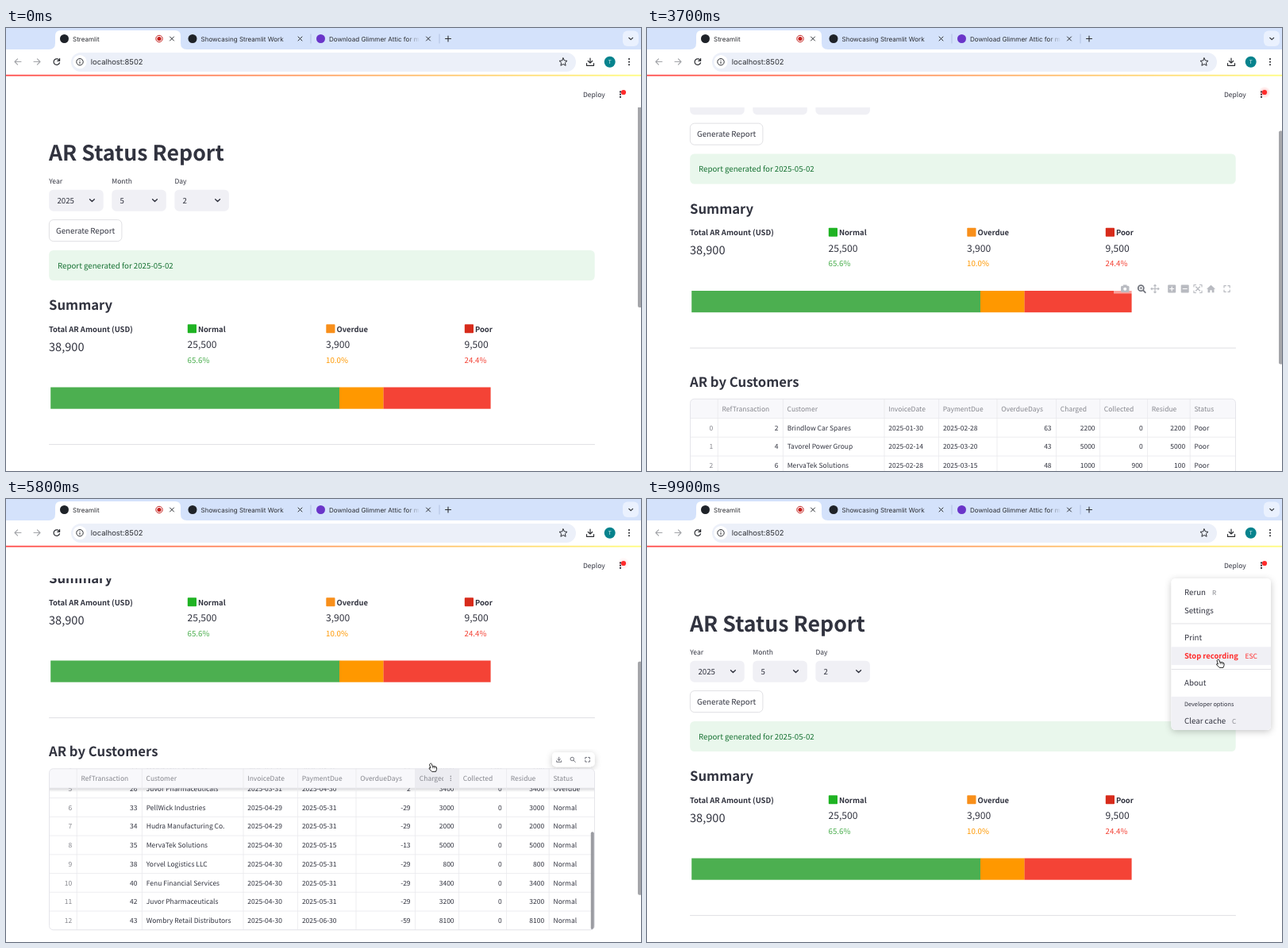
These frames come from a looping animation (800 px wide and 558 px high, 10000 ms). An HTML page:

```html
<!DOCTYPE html>
<html lang="en">
<head>
<meta charset="utf-8">
<title>AR Status Report</title>
<style>
html, body { margin: 0; width: 100%; height: 100%; overflow: hidden; background: #fff; }
svg { display: block; width: 100vw; height: 100vh; }
text { font-family: "Noto Sans CJK JP", "Noto Sans CJK SC", "Noto Sans CJK", sans-serif; text-rendering: geometricPrecision; white-space: pre; }
.ui text { font-family: Inter, Roboto, sans-serif; }
</style>
</head>
<body>
<svg id="stage" viewBox="0 0 800 558"></svg>
<script>
const INK = '#31333f', GRAY = '#85868d', RED = '#ff2b2b', LINE = '#e9e9ed', TABS = '#d4e2fb';
const BOLD = 'font-weight="700"', END = 'text-anchor="end"';

const text = (x, y, s, size = 9.72, fill = INK, attr = '') =>
  `<text x="${x}" y="${y}" font-size="${size}" fill="${fill}" ${attr}>${s}</text>`;
const rect = (x, y, w, h, fill, r = 0, attr = '') =>
  `<rect x="${x}" y="${y}" width="${w}" height="${h}" rx="${r}" fill="${fill}" ${attr}/>`;
const dot = (x, y, r, fill, attr = '') => `<circle cx="${x}" cy="${y}" r="${r}" fill="${fill}" ${attr}/>`;
const line = (d, color = INK, w = 1.2) =>
  `<path d="${d}" fill="none" stroke="${color}" stroke-width="${w}" stroke-linecap="round" stroke-linejoin="round"/>`;
const kebab = (x, y, gap, r, fill) => [-gap, 0, gap].map(d => dot(x, y + d, r, fill)).join('');
const group = (id, body, attr = '') => `<g id="${id}" ${attr}>${body}</g>`;
const fade = (id, dir, stops) => `<linearGradient id="${id}" ${dir}>` +
  stops.map(([o, c, a]) => `<stop offset="${o}" stop-color="${c}" stop-opacity="${a}"/>`).join('') + '</linearGradient>';

const defs = `<defs>
  <clipPath id="pageClip">${rect(0, 100, 800, 458, '#000')}</clipPath>
  <clipPath id="tableClip">${rect(54.5, 588.75, 687, 203, '#000', 5)}</clipPath>
  ${fade('rainbow', '', [[0, '#ff4b4b', 1], [1, '#fffd80', 1]])}
  ${fade('tabEnd', '', [[0, TABS, 0], [.7, TABS, 1]])}
  ${fade('under', 'x2="0" y2="1"', [[0, '#31333f', .2], [1, '#31333f', 0]])}
  <radialGradient id="glowFill"><stop offset=".35" stop-color="#ff2b2b"/><stop offset="1" stop-color="#ff2b2b" stop-opacity="0"/></radialGradient>
  <filter id="shadow" x="-20%" y="-20%" width="140%" height="140%"><feDropShadow dx="0" dy="2" stdDeviation="4" flood-color="#000" flood-opacity=".22"/></filter>
</defs>`;

function browser() {
  const dark = '#2c2e33';
  const close = x => line(`M${x - 2.5} 11l5 5m0-5l-5 5`, dark, 1);
  return group('browser',
    rect(0, 0, 800, 28, TABS) + rect(0, 27, 800, 32, '#fff') +
    `<path d="M54 27q8 0 8-8V10q0-7 7-7H213q7 0 7 7V19q0 8 8 8z" fill="#fff"/>` +
    dot(73.5, 13.5, 5.5, '#1f2329') + text(84, 16.5, 'Streamlit', 8.05, dark) +
    dot(193, 13.5, 4.2, 'none', 'stroke="#c5221f" stroke-width="1"') + dot(193, 13.5, 2.6, '#c5221f') +
    dot(235, 13.5, 5.5, '#1f2329') + text(245.5, 16.5, 'Showcasing Streamlit Work', 8.05, dark) +
    dot(396.5, 13.5, 5.5, '#6a35c9') + text(407, 16.5, 'Download Glimmer Attic for m', 8.05, dark) +
    rect(506, 5, 22, 17, 'url(#tabEnd)') + close(209) + close(370.5) + close(532) +
    line('M384 8v11M546 8v11', '#a9bbdc', .8) + line('M553.5 13.5h7m-3.5-3.5v7', dark, 1.1) +
    rect(777, 3.5, 20, 19.5, '#eaf1fe', 6) + line('M784.8 12.3l2.4 2.4 2.4-2.4', dark) +
    line('M19 42.5h-8m3.6-3.6l-3.6 3.6 3.6 3.6M35 42.5h8m-3.6-3.6l3.6 3.6-3.6 3.6', '#a3a5a9', 1.1) +
    line('M67.3 41a3.8 3.8 0 1 0 .2 2.8M67.6 38.6v2.8h-2.8', dark) +
    rect(82, 31, 636, 24, '#ecf0f9', 12) + dot(93, 42.7, 8.6, '#fff') +
    dot(93, 42.7, 4.2, 'none', `stroke="${dark}" stroke-width="1"`) + line('M93 42.5v2.1M93 40.6v.1', dark, 1) +
    text(106.8, 46, 'localhost:8502', 9.4, dark) +
    line('M702 37.8l1.5 3.2 3.5.4-2.6 2.4.7 3.5-3.1-1.8-3.1 1.8.7-3.5-2.6-2.4 3.5-.4z', dark, 1) +
    line('M736 38v6m-2.7-2.5l2.7 2.7 2.7-2.7M731.5 44.5v2.8h9v-2.8', dark) +
    dot(760.7, 42.7, 7, '#07838d') + text(760.7, 45, 'T', 6.2, '#fff', 'text-anchor="middle"') +
    kebab(785, 42.7, 3.6, 1.05, dark) + rect(0, 58.8, 800, 1.8, 'url(#rainbow)'), 'class="ui"');
}

function form() {
  const select = (x, label, value) => text(x, 195.7, label, 8.5) + rect(x, 203.7, 68.5, 27, '#f0f0f5', 5.4) +
    text(x + 10.2, 220.8, value) + line(`M${x + 51.3} 215.7l2.9 2.9 2.9-2.9`, INK, 1.4);
  return text(54, 166.5, 'AR Status Report', 26.7, INK, BOLD) +
    select(54.2, 'Year', '2025') + select(133.3, 'Month', '5') + select(212.4, 'Day', '2') +
    rect(54.4, 241.6, 91.5, 27, '#fff', 5.4, 'stroke="#d8d8dc" stroke-width=".8"') +
    text(63, 258.9, 'Generate Report') +
    rect(54.2, 280, 687.5, 38, '#e9f7ec', 5.4) + text(65, 302.7, 'Report generated for 2025-05-02', 9.72, '#177233');
}

function summary() {
  const part = (x, name, sum, share, square, color) => rect(x + .3, 373.2, 11.2, 11, square, .8) +
    text(x + 13.4, 382.6, name, 9.45, INK, BOLD) + text(x, 403.4, sum, 12.14) + text(x, 421.8, share, 9.72, color);
  return text(54, 355, 'Summary', 16.7, INK, BOLD) +
    text(54, 382.6, 'Total AR Amount (USD)', 9.45, INK, BOLD) + text(54, 406.6, '38,900', 14.57) +
    part(228.5, 'Normal', '25,500', '65.6%', '#1fb323', '#4caf50') +
    part(403, 'Overdue', '3,900', '10.0%', '#f88f1a', '#ff9800') +
    part(577.5, 'Poor', '9,500', '24.4%', '#d72b1b', '#f44336') +
    rect(56.2, 452.5, 364, 27.2, '#4caf50') + rect(420, 452.5, 55.7, 27.2, '#ff9800') +
    rect(475.6, 452.5, 135, 27.2, '#f44336') + line('M54.5 524.6H741.5', '#dcdce0', .9);
}

function modebar() {
  const c = '#b9bbc1';
  const sign = (x, d) => rect(x - 5, 445, 10, 10, c, 1) + line(d, '#fff');
  return group('modebar', rect(588, 443, 150, 13, '#fff', 0, 'opacity=".5"') +
    rect(597, 446.3, 10.5, 8, c, 1.5) + rect(600, 445, 4.5, 2, c) + dot(602.2, 450.3, 2, '#fff') +
    dot(622.3, 449.2, 3.5, 'none', 'stroke="#70737c" stroke-width="1.8"') + line('M625.3 452.2l2.5 2.5', '#70737c', 1.8) +
    line('M621 449.2h2.6m-1.3-1.3v2.6', '#70737c', .9) +
    line('M635 450h10m-5-5v10m-1.2-8.8l1.2-1.2 1.2 1.2m-2.4 7.6l1.2 1.2 1.2-1.2m-5-5l-1.2 1.2 1.2 1.2m7.6-2.4l1.2 1.2-1.2 1.2', c) +
    sign(661.2, 'M658.7 450h5m-2.5-2.5v5') + sign(677.7, 'M675.2 450h5') +
    line('M689 447.5v-2.5h2.5m5 0h2.5v2.5m0 5v2.5h-2.5m-5 0h-2.5v-2.5M691.5 447.5l5 5m0-5l-5 5', c) +
    `<path d="M705 450.3l5.5-5 5.5 5h-1.5v4.4h-2.8v-3h-2.4v3h-2.8v-4.4z" fill="${c}"/>` +
    line('M727 448.5v-2.3h2.3m2.6 0h2.3v2.3m0 3v2.3h-2.3m-2.6 0h-2.3v-2.3', c));
}

const FIRMS = {
  B: 'Brindlow Car Spares', T: 'Tavorel Power Group', M: 'MervaTek Solutions', J: 'Juvor Pharmaceuticals',
  P: 'PellWick Industries', H: 'Hudra Manufacturing Co.', Y: 'Yorvel Logistics LLC',
  F: 'Fenu Financial Services', W: 'Wombry Retail Distributors'
};
// reference, firm, invoice date, due date, charged, collected
const ROWS = `2 B 01-30 02-28 2200 0
4 T 02-14 03-20 5000 0
6 M 02-28 03-15 1000 900
11 B 02-28 03-31 2200 0
22 M 03-31 04-15 1000 500
26 J 03-31 04-30 3400 0
33 P 04-29 05-31 3000 0
34 H 04-29 05-31 2000 0
35 M 04-30 05-15 5000 0
38 Y 04-30 05-31 800 0
40 F 04-30 05-31 3400 0
42 J 04-30 05-31 3200 0
43 W 04-30 06-30 8100 0`.split('\n').map(r => r.split(' '));
const HEADS = ['RefTransaction', 'Customer', 'InvoiceDate', 'PaymentDue', 'OverdueDays', 'Charged', 'Collected', 'Residue', 'Status'];
const EDGES = [54.5, 89.3, 171.4, 299, 367.6, 441, 515.6, 570.6, 630.6, 684.2, 741.5];
const TOP = 588.75, ROW = 23.75;

function table() {
  const isLeft = c => [2, 3, 4, 9].includes(c);
  const cell = (s, c, y) => isLeft(c) ? text(EDGES[c] + 5.3, y, s, 8.5)
    : text(EDGES[c + 1] - 6, y, s, 8.5, c ? INK : GRAY, END);
  const rows = ROWS.map(([ref, firm, made, due, charged, paid], i) => {
    const days = (Date.UTC(2025, 4, 2) - Date.parse('2025-' + due)) / 864e5;
    const status = days > 30 ? 'Poor' : days > 0 ? 'Overdue' : 'Normal';
    const y = TOP + 24.3 + ROW * i;
    return [i, ref, FIRMS[firm], '2025-' + made, '2025-' + due, days, charged, paid, charged - paid, status]
      .map((s, c) => cell(s, c, y + 15.1)).join('') + line(`M54.5 ${y + ROW}H741.5`, LINE, .8);
  }).join('');
  const heads = HEADS.map((s, i) => text(EDGES[i + 1] + 5.2, TOP + 15.3, s, 8.5, GRAY)).join('');
  const y = TOP - 11.5;
  const tools = group('tools', rect(688, y - 9, 53.5, 18, '#fff', 5, 'filter="url(#shadow)"') +
    rect(688, y - 9, 53.5, 18, '#fff', 5) +
    line(`M696.7 ${y - 3}v4m-1.8-1.7l1.8 1.8 1.8-1.8M693.7 ${y + 1.5}v1.5h6v-1.5M714.8 ${y + .8}l2.4 2.4`, '#6f717a', 1) +
    dot(713.3, y - .8, 2.2, 'none', 'stroke="#6f717a"') +
    line(`M729.8 ${y - 1}v-1.8h1.8m2 0h1.8v1.8m0 2v1.8h-1.8m-2 0h-1.8v-1.8`, '#6f717a', 1));
  return text(54, 573, 'AR by Customers', 16.7, INK, BOLD) + tools +
    group('table', rect(54, TOP, 688, 203, '#fff') + group('rows', rows) +
      group('under5', rect(54, TOP + 24.3, 688, 5, 'url(#under)')) +
      rect(54, TOP, 688, 24.3, '#f8f8fb') + group('hoverBack', rect(515.6, TOP, 55, 24.3, '#ececf1')) + heads +
      group('hoverMenu', rect(551, TOP + 1, 19, 22, '#ececf1') + kebab(560.3, TOP + 12.2, 2.6, .8, GRAY)) +
      line(`M54.5 ${TOP + 24.3}H741.5` + EDGES.slice(1, -1).map(x => `M${x} ${TOP}v203`).join(''), LINE, .8) +
      group('tableBar', rect(736.8, TOP + .5, 4, 123, '#9b9ca2', 2)), 'clip-path="url(#tableClip)"') +
    rect(54.5, TOP, 687, 203, 'none', 5, 'stroke="#e3e3e8" stroke-width=".9"');
}

function menu() {
  const item = (y, s) => text(677, y + 3.7, s);
  return group('menu', rect(660.5, 100, 125.5, 191, '#fff', 5.4, 'filter="url(#shadow)"') +
    `<path d="M660.5 249H786v36.6q0 5.4-5.4 5.4H665.9q-5.4 0-5.4-5.4z" fill="#f0f0f5"/>` +
    rect(660.5, 186.3, 125.5, 22.8, '#f0f0f5') +
    line('M661 157H785.5M661 214.5H785.5', '#dedee2', .9) +
    item(117.3, 'Rerun') + text(712, 120.7, 'R', 8.1, GRAY) + item(140, 'Settings') + item(174.2, 'Print') +
    text(677, 201.2, 'Stop recording', 9.4, RED, BOLD) + text(753.5, 201, 'ESC', 8.5, RED) +
    item(231.5, 'About') + text(677, 261.2, 'Developer options', 7.3) + item(279, 'Clear cache') +
    text(737, 282.5, 'C', 8.1, GRAY));
}

const arrow = `<path d="M0 0v10l2.3-2.1 1.5 3.4 1.7-.8-1.5-3.2h3.1z" fill="#111" stroke="#fff" stroke-width=".8"/>`;
const hand = `<path d="M-1.5.4q1.1-.9 1.8.3l1 3.1q3.3-.6 4.9.8.7 1.2.3 3l-1 2.8H.6L-2.6 7q-.9-1.3.2-1.6l1.3.7-1.3-4.4q-.1-.9.9-1.3z" fill="#fff" stroke="#111" stroke-width=".9"/>` +
  line('M1.6 4v1.8M3.3 4v1.8M5 4.6v1.4', '#111', .6);

const stage = document.getElementById('stage');
stage.innerHTML = defs + rect(0, 0, 800, 558, '#fff') +
  `<g clip-path="url(#pageClip)">${group('page', form() + summary() + modebar() + table())}${group('pageBar', rect(796, 58, 5, 294, '#a5a6aa', 2))}</g>` +
  text(727, 87.2, 'Deploy', 8.5) + kebab(774, 83.7, 3.2, 1.15, INK) +
  group('glow', dot(778, 81, 7.5, 'url(#glowFill)')) + dot(778, 81, 3.1, RED) +
  browser() + menu() + group('cursor', group('arrow', arrow) + group('hand', hand));

const $ = id => document.getElementById(id);
const move = (id, x, y) => $(id).setAttribute('transform', `translate(${x} ${y})`);
const show = (id, amount) => $(id).setAttribute('opacity', +amount);
const between = (t, a, b) => t >= a && t < b;
const smooth = p => p * p * (3 - 2 * p);
const clamp = p => Math.max(0, Math.min(1, p));

// Keys are [time, value, ...]; returns the interpolated values at t.
function track(keys, t, ease = p => p) {
  const i = keys.findIndex(k => k[0] > t);
  if (i === 0) return keys[0].slice(1);
  if (i < 0) return keys[keys.length - 1].slice(1);
  const a = keys[i - 1], b = keys[i], p = ease((t - a[0]) / (b[0] - a[0]));
  return a.slice(1).map((v, n) => v + (b[n + 1] - v) * p);
}

const SCROLL = [[2300, 0], [2700, 34], [3700, 121.5], [4600, 246.5], [4800, 246.5], [5000, 249], [6500, 249], [7100, 348], [7400, 348], [7900, 0]];
const TABLE_SCROLL = [[4900, 0], [5600, 130], [5900, 130], [6400, 0]];
const POINTER = [[900, 380, 262], [2400, 523, 357], [5200, 523, 357], [5700, 536, 333], [6300, 536, 333], [7100, 671, 180],
  [7800, 671, 180], [8500, 776, 82], [8900, 776, 82], [9700, 720.5, 202]];

function draw(t) {
  const [scroll] = track(SCROLL, t), [inner] = track(TABLE_SCROLL, t, smooth);
  move('page', 0, -scroll);
  move('pageBar', 0, scroll * .589);
  show('pageBar', t < 2300 ? clamp((900 - t) / 300) : clamp((8600 - t) / 300));
  move('rows', 0, -inner);
  move('tableBar', 0, inner * 79 / 130);
  show('tableBar', inner > 0);
  show('under5', inner > 0);
  show('tools', between(t, 5000, 6500));
  const hover = between(t, 5700, 6400);
  show('hoverBack', hover);
  show('hoverMenu', hover);
  show('modebar', between(t, 3100, 4100));
  show('menu', t >= 8800);
  show('glow', (1 - Math.cos(t * Math.PI / 1000)) / 2);
  const isHand = hover || t >= 8400;
  move('cursor', ...track(POINTER, t, smooth));
  show('cursor', between(t, 900, 3000) || between(t, 5300, 6400) || t >= 6800);
  show('arrow', !isHand);
  show('hand', isHand);
}

const start = performance.now();
function tick() {
  const t = Math.floor((performance.now() - start) % 10000 / 100) * 100;
  draw(t < 300 ? 0 : t);
  requestAnimationFrame(tick);
}
tick();
</script>
</body>
</html>
```
